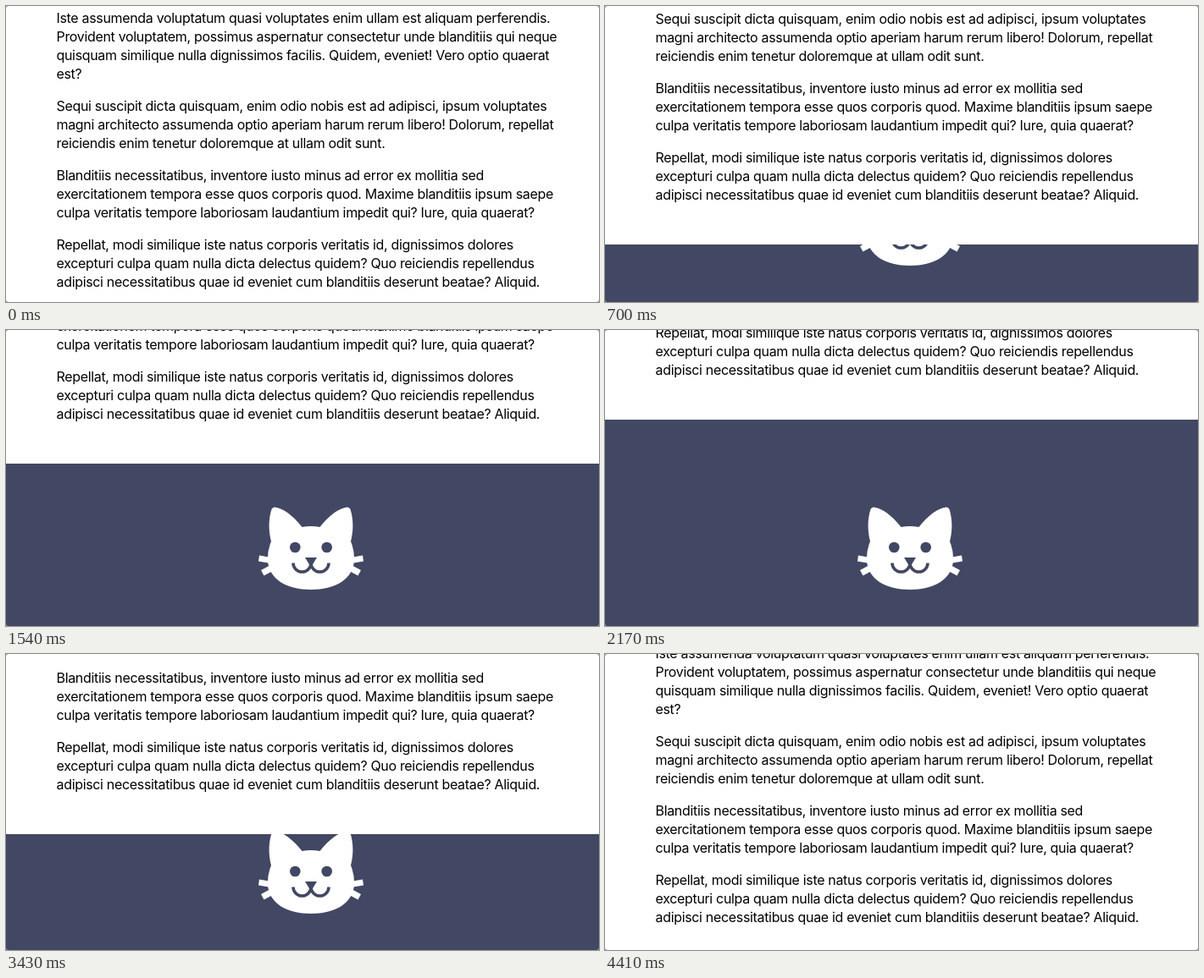
Write an HTML page that moves like this. It is 700x350 px and loops after 4.48 s.

```html
<!DOCTYPE html>
<html lang="en">
<head>
<meta charset="utf-8">
<title>Footer reveal</title>
<style>
  html, body {
    margin: 0;
    width: 100%;
    height: 100%;
    overflow: hidden;
    background: #a3a3a5;
  }
  .stage {
    position: relative;
    width: 700px;
    height: 350px;
    overflow: hidden;
    border-radius: 3px;
    background: #424763;
  }
  .cat {
    position: absolute;
    left: 0;
    top: 0;
  }
  .page {
    position: absolute;
    left: 0;
    bottom: 350px;
    box-sizing: border-box;
    width: 700px;
    min-height: 420px;
    padding: 0 0 48px 59.5px;
    display: flex;
    flex-direction: column;
    justify-content: flex-end;
    background: #fff;
    color: #000;
    font: 16px/22px Inter, "Liberation Sans", sans-serif;
    letter-spacing: -0.328px;
  }
  p {
    margin: 16px 0 0;
    white-space: pre;
  }
</style>
</head>
<body>
<div class="stage">
  <svg class="cat" width="700" height="350" viewBox="0 0 700 350">
    <g fill="#fff">
      <path d="M317 209.5C327 210.500 339 219.500 349.500 233Q360 231 370.500 233C381 219.500 393 210.500 403 209.5Q405.500 209.5 406.500 212C410 223 410.500 236 407 250Q411.500 261 411 272C410 295 388 307 360 307S310 295 309 272Q308.500 261 313 250C309.500 236 310 223 313.500 212Q314.500 209.5 317 209.5Z"/>
      <path id="whiskers" d="M299 266.500L313 269V276L298 273.500ZM301 284L313 277.500L316.500 284L304.500 290.500Z"/>
      <use href="#whiskers" transform="matrix(-1 0 0 1 720 0)"/>
    </g>
    <g fill="#424763">
      <circle cx="341.300" cy="257" r="6.300"/>
      <circle cx="378.700" cy="257" r="6.300"/>
      <path d="M353 269H367L361.500 278H358.500Z"/>
    </g>
    <path d="M339 275.500A10.500 10.500 0 0 0 360 275.500A10.500 10.500 0 0 0 381 275.500" fill="none" stroke="#424763" stroke-width="3.600"/>
  </svg>
  <div class="page">
<p>Iste assumenda voluptatum quasi voluptates enim ullam est aliquam perferendis.
Provident voluptatem, possimus aspernatur consectetur unde blanditiis qui neque
quisquam similique nulla dignissimos facilis. Quidem, eveniet! Vero optio quaerat
est?</p>
<p>Sequi suscipit dicta quisquam, enim odio nobis est ad adipisci, ipsum voluptates
magni architecto assumenda optio aperiam harum rerum libero! Dolorum, repellat
reiciendis enim tenetur doloremque at ullam odit sunt.</p>
<p>Blanditiis necessitatibus, inventore iusto minus ad error ex mollitia sed
exercitationem tempora esse quos corporis quod. Maxime blanditiis ipsum saepe
culpa veritatis tempore laboriosam laudantium impedit qui? Iure, quia quaerat?</p>
<p>Repellat, modi similique iste natus corporis veritatis id, dignissimos dolores
excepturi culpa quam nulla dicta delectus quidem? Quo reiciendis repellendus
adipisci necessitatibus quae id eveniet cum blanditiis deserunt beatae? Aliquid.</p>
  </div>
</div>
<script>
  const STEP = 70, COUNT = 64;

  // [step, y of the page's bottom edge]
  const stops = [
    [0, 385], [6, 315], [8, 303], [14, 232], [22, 158],
    [31, 106], [41, 148], [49, 213], [56, 299], [63, 370]
  ];

  const slope = i => (stops[i + 1][1] - stops[i][1]) / (stops[i + 1][0] - stops[i][0]);

  // Harmonic mean keeps the curve from overshooting its stops.
  function tangent(i) {
    if (i === 0) return slope(0);
    if (i === stops.length - 1) return slope(i - 1);
    const a = slope(i - 1), b = slope(i);
    return a * b > 0 ? 2 * a * b / (a + b) : 0;
  }

  function edgeAt(step) {
    let i = 0;
    while (i < stops.length - 2 && step > stops[i + 1][0]) i++;
    const [x0, y0] = stops[i], [x1, y1] = stops[i + 1];
    const w = x1 - x0, t = (step - x0) / w, u = 1 - t;
    return y0 * u * u * (1 + 2 * t) + y1 * t * t * (3 - 2 * t)
      + w * t * u * (u * tangent(i) - t * tangent(i + 1));
  }

  const pose = (step, offset) => ({
    transform: `translateY(${Math.round(edgeAt(step))}px)`,
    offset,
    easing: "steps(1, end)"
  });

  const frames = Array.from({ length: COUNT }, (_, i) => pose(i, i / COUNT));
  frames.push(pose(COUNT - 1, 1));

  // The page rests with its bottom edge at y = 0 before the shift.
  document.querySelector(".page").animate(frames, {
    duration: STEP * COUNT,
    iterations: Infinity
  });
</script>
</body>
</html>
```
